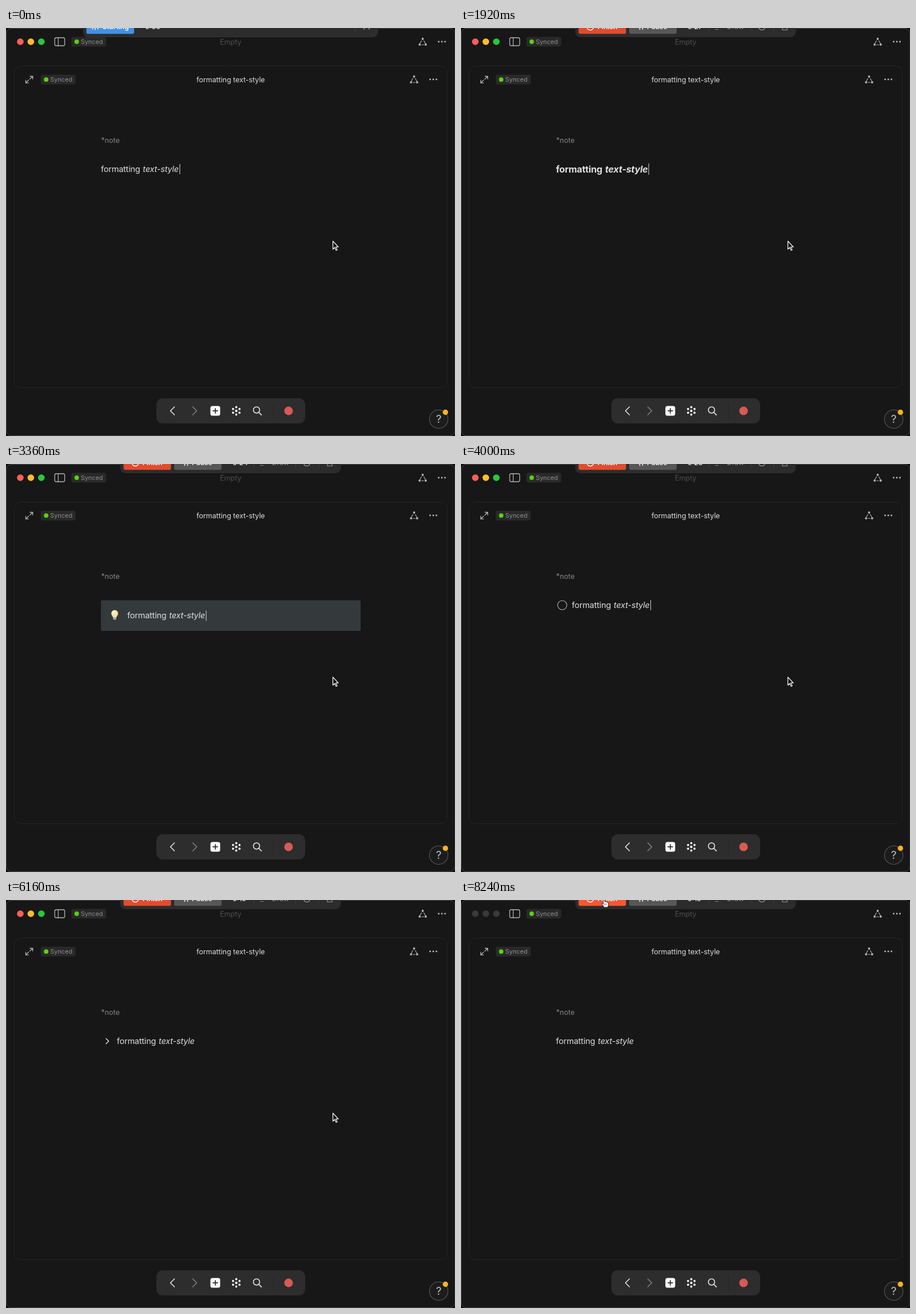
Animation, 785 px wide and 714 px high, one loop 8.32 s. Source, as an HTML page with a canvas:

```html
<!DOCTYPE html>
<html lang="en">
<head>
<meta charset="utf-8">
<title>formatting text-style</title>
<style>
  html, body { margin: 0; width: 785px; height: 714px; overflow: hidden; background: #171717; }
  canvas { display: block; width: 785px; height: 714px; }
</style>
</head>
<body>
<canvas id="stage"></canvas>
<script>
const W = 785, H = 714, LOOP = 8320, STEP = 80, BLINK = 320;
const FONT = 'Inter, "Liberation Sans", sans-serif';
const canvas = document.getElementById('stage');
const ctx = canvas.getContext('2d');
const dpr = window.devicePixelRatio || 1;
canvas.width = W * dpr;
canvas.height = H * dpr;

// Text styles: size, weight, tracking, italic offset, caret offset, baseline, caret top and bottom
const body = { size: 14.4, weight: 400, track: -0.011, ital: 73.3, end: 137.7, base: 251.8, top: 238, bottom: 256 };
const h1 = { size: 25.2, weight: 700, track: -0.022, ital: 132.8, end: 250, base: 262, top: 237, bottom: 269 };
const h2 = { size: 19.8, weight: 700, track: -0.019, ital: 105, end: 197, base: 256, top: 237, bottom: 262 };
const h3 = { size: 16.2, weight: 700, track: -0.014, ital: 86, end: 162, base: 252.6, top: 237, bottom: 257 };

const blocks = [
  { at: 0, x: 166, style: body },
  { at: 480, x: 166, style: h1 },
  { at: 1280, x: 166, style: h2 },
  { at: 1920, x: 166, style: h3 },
  { at: 2560, x: 183, style: body, mark: quote },
  { at: 3280, x: 212, style: body, dy: 18.4, mark: callout },
  { at: 3920, x: 193.7, style: body, mark: checkbox },
  { at: 4640, x: 193.7, style: body, mark: bullet },
  { at: 5280, x: 193.7, style: body, mark: number },
  { at: 5840, x: 193.7, style: body, mark: toggle },
  { at: 6720, x: 166, style: body }
];

function box(x, y, w, h, r, fill, stroke, lw = 1) {
  ctx.beginPath();
  ctx.roundRect(x, y, w, h, r);
  paint(fill, stroke, lw);
}

function disc(x, y, r, fill, stroke, lw = 1) {
  ctx.beginPath();
  ctx.arc(x, y, r, 0, Math.PI * 2);
  paint(fill, stroke, lw);
}

function paint(fill, stroke, lw) {
  if (fill) { ctx.fillStyle = fill; ctx.fill(); }
  if (stroke) { ctx.strokeStyle = stroke; ctx.lineWidth = lw; ctx.stroke(); }
}

function path(d, color, lw = 1.4) {
  ctx.lineCap = ctx.lineJoin = 'round';
  ctx.strokeStyle = color;
  ctx.lineWidth = lw;
  ctx.stroke(new Path2D(d));
}

function text(str, x, y, size, color, weight = 400, opt = {}) {
  ctx.font = `${opt.italic ? 'italic ' : ''}${weight} ${size}px ${FONT}`;
  ctx.letterSpacing = `${(opt.track || 0) * size}px`;
  ctx.textAlign = opt.align || 'left';
  ctx.fillStyle = color;
  ctx.fillText(str, x, y);
}

function quote() {
  box(166, 236, 2, 23, 1, '#d8d8d8');
}

function callout() {
  box(166, 238.5, 454, 53.5, 2, '#343a3b');
  ctx.fillStyle = '#fbe3a6';
  ctx.fill(new Path2D('M184 261.5a6 6 0 1 1 12 0c0 3-2.6 4.4-3 7.2h-6c-.4-2.8-3-4.200-3-7.200z'));
  disc(188.4, 260, 2.6, '#fff5d8');
  box(187.2, 268.5, 5.6, 4, 1.5, '#a7aaac');
}

function checkbox() {
  disc(177, 247, 8, null, '#b4b4b4', 1.1);
}

function bullet() {
  disc(177, 247, 2.6, '#dcdcdc');
}

function number() {
  text('1.', 172, body.base, body.size, '#dcdcdc');
}

function toggle() {
  path('M175 242.500l4.500 4.500l-4.500 4.500', '#dcdcdc', 1.5);
}

function synced(x, y) {
  box(x, y - 8.5, 61, 17, 4, '#292929');
  disc(x + 9.4, y, 3.9, '#58d20d');
  text('Synced', x + 16.5, y + 3.9, 10.9, '#8e8e8e');
}

function graphIcon(x, y) {
  path(`M${x - 2} ${y - 1.6}l-2.600 4.200M${x + 2} ${y - 1.6}l2.600 4.200M${x - 2} ${y + 5.2}h4`, '#a8a8a8', 1.1);
  for (const [dx, dy] of [[0, -5], [-5.3, 5], [5.3, 5]]) disc(x + dx, y + dy, 1.9, '#b8b8b8');
}

function dots(x, y) {
  for (const dx of [-5.5, 0, 5.5]) disc(x + dx, y, 1.45, '#bdbdbd');
}

function frame(active) {
  ctx.fillStyle = '#0c0c0c';
  ctx.fillRect(0, 0, W, H);
  box(0.5, 0.5, 784.5, 713, 9, '#171717', active ? '#4c4c4c' : '#434343');
  ['#ff5f57', '#febc2e', '#28c840'].forEach((c, i) =>
    disc(25 + i * 18.4, 24, 5.8, active ? c : '#3a3a3a'));
  box(85.2, 17, 17.4, 14, 2.5, null, '#b4b4b4', 1.3);
  path('M91.300 17v14', '#b4b4b4', 1.2);
  synced(114.2, 24);
  text('Empty', 392.8, 28.5, 12.6, '#4e4e4e', 400, { align: 'center' });
  graphIcon(728.5, 24);
  dots(762, 24);

  box(14.5, 66.5, 757, 563, 11, null, '#252525');
  path('M42 84.500h4.700v4.700M46.500 84.700l-4.800 4.800M34.500 91.500v4.700h4.700M34.700 96l4.800-4.800', '#b4b4b4', 1.3);
  synced(60.8, 90.2);
  text('formatting text-style', 392.8, 94.8, 12.6, '#dedede', 400, { align: 'center', track: -0.006 });
  graphIcon(713.5, 90);
  dots(747, 90);
  text('*note', 166.3, 201, 12.6, '#858585');
}

function dock() {
  box(263, 648, 260, 44, 11, '#2d2d2d');
  path('M294.500 663l-7 7l7 7', '#ececec', 1.5);
  path('M326.500 663l7 7l-7 7', '#858585', 1.5);
  box(357.4, 661.4, 17, 17, 3.5, '#ffffff');
  path('M365.900 665.900v8M361.900 669.900h8', '#2d2d2d', 1.7);
  disc(402.6, 670, 2.2, '#f4f4f4');
  for (let i = 0; i < 6; i++) {
    const a = i * Math.PI / 3 + Math.PI / 6;
    disc(402.6 + Math.cos(a) * 6.5, 670 + Math.sin(a) * 6.5, 1.9, '#f4f4f4');
  }
  disc(438, 668.5, 5.5, null, '#ececec', 1.5);
  path('M442.100 672.700l4.400 4.400', '#ececec', 1.6);
  path('M467.500 657v26', '#242424', 1);
  disc(494, 670, 7.5, '#d85a55');
  disc(756.5, 684.5, 16.2, '#1c1c1c', '#585858', 1.1);
  text('?', 756.5, 691.3, 19, '#c4c4c4', 400, { align: 'center' });
  disc(768.3, 672.5, 4.7, '#fdb022');
}

function note(t) {
  const b = blocks.filter(o => o.at <= t).pop();
  const s = b.style, dy = b.dy || 0, ink = '#dfdfdf';
  if (b.mark) b.mark();
  text('formatting', b.x, s.base + dy, s.size, ink, s.weight, { track: s.track });
  text('text-style', b.x + s.ital, s.base + dy, s.size, ink, s.weight, { track: s.track, italic: true });
  const lit = Math.floor((t - b.at) / BLINK) % 2 === 0;
  if (lit && t < 7920) {
    ctx.fillStyle = '#d6d6d6';
    ctx.fillRect(b.x + s.end - 0.3, s.top + dy, 1, s.bottom - s.top);
  }
}

function timer(t) {
  const left = Math.min(30, Math.floor(31.23 - 1.88 * t / 1000));
  return '0:' + String(left).padStart(2, '0');
}

function startBar(t) {
  box(135.5, -40, 514, 55.5, 8, '#2c2c2c', '#353535');
  box(140.5, -20, 83.5, 30.3, 3, '#4191e6');
  path('M156 -1v4M152.500 -1l-1.500 3M159.500 -1l1.500 3', '#ffffff', 1.4);
  text('Starting', 168.5, 2, 12, '#ffffff', 600);
  text(timer(t), 243, 2, 12.2, '#e6e6e6', 500);
  path('M610.500 -8v14', '#404040', 1);
  path('M625.500 2l5-5l5 5', '#a0a0a0', 1.3);
}

function recordBar(t, hover) {
  box(200.5, -40, 384, 55.3, 8, '#2c2c2c', '#343434');
  box(205.5, -20, 83, 30.2, 3, hover ? '#fb5631' : '#e24c2d');
  disc(226, -2, 5.8, null, '#ffffff', 1.4);
  text('Finish', 238.7, 2, 12, '#ffffff', 600);
  box(294, -20, 83, 30.2, 3, '#575757');
  path('M312.500 -6v8.500M317.500 -6v8.500', '#f0f0f0', 1.6);
  text('Pause', 325, 2, 12, '#f0f0f0', 600);
  text(timer(t), 396, 2, 12.2, '#f0f0f0', 500);
  path('M433.500 -8v14M506.500 -8v14M546.500 -8v14', '#404040', 1);
  path('M444.500 2.500h5.500M450 -1l4-4', '#858585', 1.2);
  text('Draw', 465, 2, 12, '#858585', 500);
  disc(526, -2, 5.6, null, '#929292', 1.3);
  path('M562 -5v8.500h8v-8.500M564.700 -5v5M567.300 -5v5', '#929292', 1.2);
}

function pointer(x, y, hand) {
  const arrow = 'M0 0v14l3.200-3l2.300 5.100l2-.900l-2.200-5h4.200z';
  const palm = 'M-1.600 1.200c0-1.800 2.800-1.800 2.800 0v4.300c1-.8 2.300-.4 2.500.5c1-.6 2.200-.2 2.300.7c1.100-.2 1.900.4 1.900 1.500v2.300c0 2-1.300 3-1.500 4.900h-6.400c-.4-2-2.200-3.300-3.400-5.400c-.8-1.500.7-2.300 1.800-1.200z';
  const shape = new Path2D(hand ? palm : arrow);
  ctx.save();
  ctx.translate(x, y);
  ctx.lineJoin = 'round';
  ctx.lineWidth = hand ? 1 : 1.3;
  ctx.fillStyle = hand ? '#ffffff' : '#0a0a0a';
  ctx.strokeStyle = hand ? '#151515' : '#f4f4f4';
  ctx.fill(shape);
  ctx.stroke(shape);
  if (hand) path('M2 8.500v3M4 8.700v2.800M0 8.500v3', '#333333', 0.6);
  ctx.restore();
}

function draw(t) {
  const active = t < 7920;
  const p = Math.min(1, Math.max(0, (t - 6960) / 1280));
  const e = p * p * (3 - 2 * p);
  const x = 571.5 + (250 - 571.5) * e;
  const y = 373 + (-2.5 - 373) * e;
  const hover = t > 7600 && y < 10;

  ctx.setTransform(dpr, 0, 0, dpr, 0, 0);
  frame(active);
  note(t);
  dock();
  if (t < 80) startBar(t); else recordBar(t, hover);
  pointer(x, y, hover);
}

const began = performance.now();
function tick() {
  const t = (performance.now() - began) % LOOP;
  draw(Math.floor(t / STEP) * STEP);
  requestAnimationFrame(tick);
}
tick();
</script>
</body>
</html>
```
